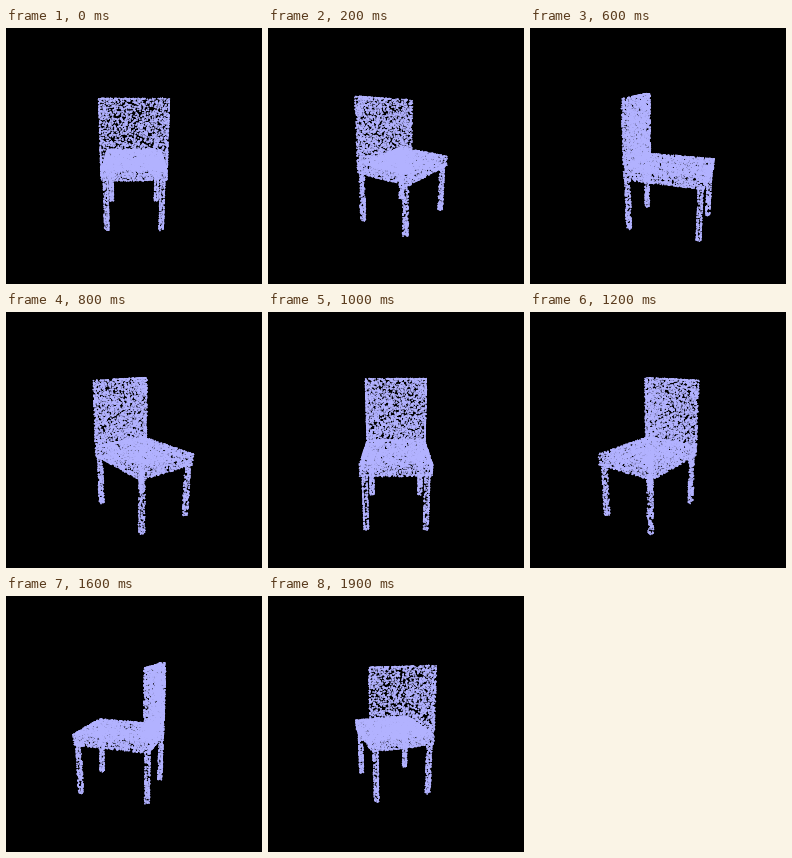
These frames come from a looping animation (256x256 px, 2 s). A matplotlib script:

```python
import numpy as np
import matplotlib.pyplot as plt
from matplotlib.animation import FuncAnimation
from matplotlib.colors import LinearSegmentedColormap

SIZE, DPI = 256, 100
FRAMES, INTERVAL = 20, 100
POINTS = 6000
RADIUS = 1.28              # dot radius in pixels
FOCAL = 300                # in pixels, for a camera at distance 1
ELEV = np.radians(16)

rng = np.random.default_rng(7)

# Chair axes: x across, y up, z towards the front of the seat
HALF_W, BACK, FRONT = 0.103, -0.080, 0.173
TOP, SEAT_TOP, SEAT_LOW, FLOOR = 0.195, -0.0225, -0.058, -0.234
LEG = 0.0065

boxes = [
    ((-HALF_W, SEAT_TOP, BACK), (HALF_W, TOP, BACK + 0.017)),
    ((-HALF_W, SEAT_LOW, BACK), (HALF_W, SEAT_TOP, FRONT)),
]
for x in (-0.09, 0.09):
    for z in (-0.073, 0.162):
        boxes.append(((x - LEG, FLOOR, z - LEG), (x + LEG, SEAT_LOW, z + LEG)))


def sample_surface(boxes, count):
    """Pick points on the box faces, evenly by area."""
    low, high = (np.array(side) for side in zip(*boxes))
    size = high - low
    areas = np.stack([size[:, 1] * size[:, 2],
                      size[:, 0] * size[:, 2],
                      size[:, 0] * size[:, 1]], axis=1)
    pick = rng.choice(areas.size, count, p=areas.ravel() / areas.sum())
    box, axis = np.divmod(pick, 3)
    t = rng.random((count, 3))
    t[np.arange(count), axis] = rng.integers(0, 2, count)
    return low[box] + t * size[box]


cloud = sample_surface(boxes, POINTS)


def project(angle):
    """Turn the cloud about the vertical axis and view it in perspective."""
    side, up, front = cloud.T
    x = front * np.sin(angle) + side * np.cos(angle)
    near = side * np.sin(angle) - front * np.cos(angle)
    depth = 1 - up * np.sin(ELEV) - near * np.cos(ELEV)
    height = up * np.cos(ELEV) - near * np.sin(ELEV)
    return SIZE / 2 + FOCAL * x / depth, SIZE / 2 - FOCAL * height / depth


def rasterize(px, py):
    """Blend soft dots whose opacity falls off as 1 - (d / r)^2."""
    clear = np.ones((SIZE, SIZE))
    col, row = np.floor(px).astype(int), np.floor(py).astype(int)
    for dy in range(-2, 3):
        for dx in range(-2, 3):
            gap = np.hypot(col + dx + 0.5 - px, row + dy + 0.5 - py) / RADIUS
            hit = gap < 1
            np.multiply.at(clear, (row[hit] + dy, col[hit] + dx), gap[hit] ** 2)
    return 1 - clear


fig = plt.figure(figsize=(SIZE / DPI, SIZE / DPI), dpi=DPI, facecolor="black")
ax = fig.add_axes([0, 0, 1, 1])
ax.axis("off")
tint = LinearSegmentedColormap.from_list("tint", ["black", "#b2b2ff"])
image = ax.imshow(np.zeros((SIZE, SIZE)), vmin=0, vmax=1, aspect="auto",
                  cmap=tint, interpolation="nearest")


def draw(frame):
    image.set_data(rasterize(*project(2 * np.pi * frame / FRAMES)))
    return (image,)


anim = FuncAnimation(fig, draw, frames=FRAMES, interval=INTERVAL,
                     init_func=lambda: draw(0), repeat=True, repeat_delay=0)
plt.show()
```
